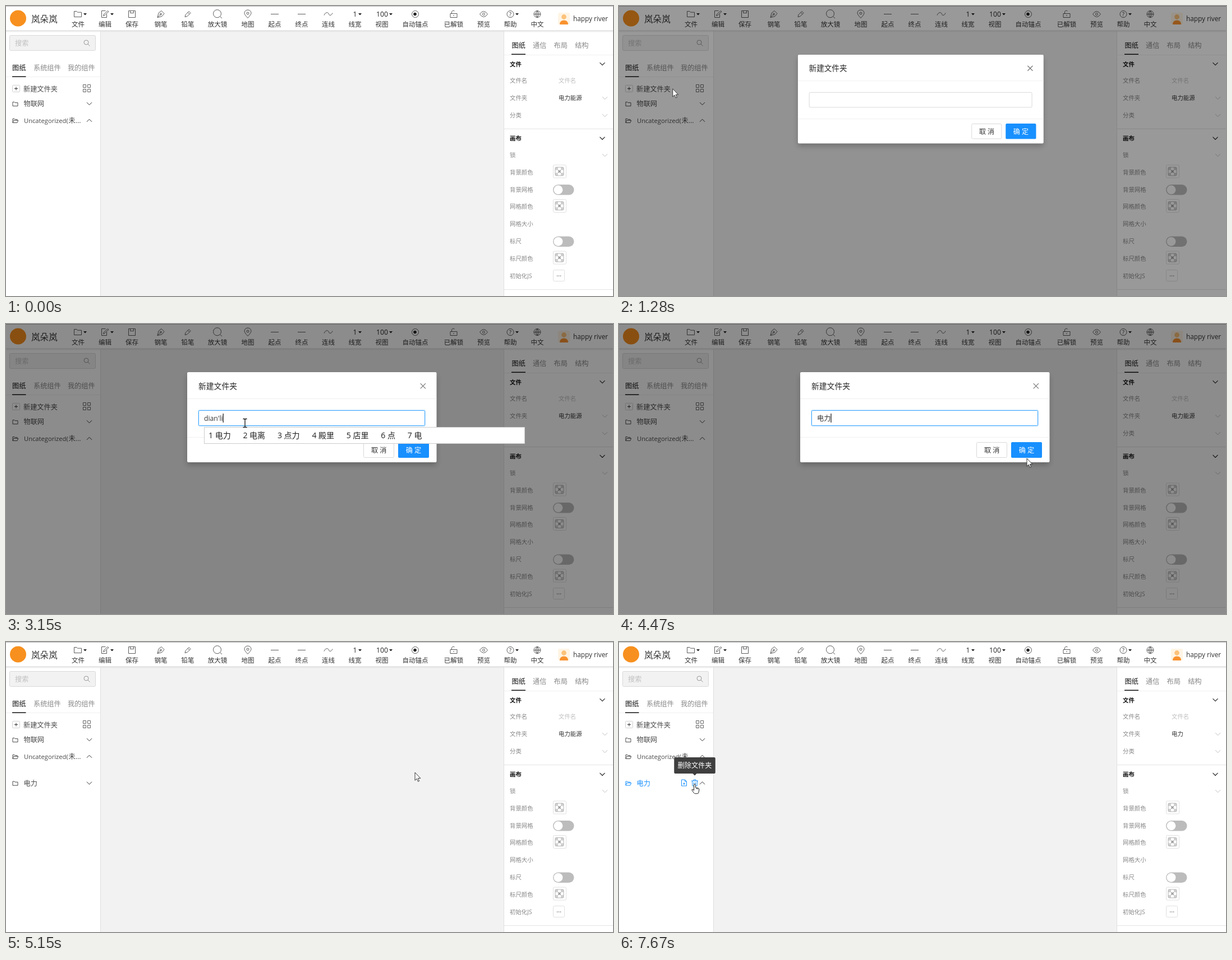
An HTML page that plays this animation: 1082 by 518 pixels, repeating every 8 s.

```html
<!DOCTYPE html>
<html lang="zh-CN">
<head>
<meta charset="utf-8">
<style>
html, body { margin: 0; width: 100%; height: 100%; overflow: hidden; background: #f2f2f2; }
svg { display: block; width: 100%; height: 100%; }
text { font-family: "Open Sans", "Noto Sans CJK SC", "Noto Sans CJK", sans-serif; white-space: pre; }
</style>
</head>
<body>
<svg id="stage" viewBox="0 0 1082 518"></svg>
<script>
const INK = '#4a4a4a', DARK = '#222', GRAY = '#888', PALE = '#bfbfbf', BLUE = '#1890ff';
const LOOP = 8000;

// Text is placed by its vertical centre.
const text = (x, cy, s, size = 12.2, fill = INK, extra = '') =>
  `<text x="${x}" y="${cy + size * .37}" font-size="${size}" fill="${fill}" ${extra}>${s}</text>`;
const mid = (x, cy, s, size, fill) => text(x, cy, s, size, fill, 'text-anchor="middle"');
const rect = (x, y, w, h, fill, extra = '') =>
  `<rect x="${x}" y="${y}" width="${w}" height="${h}" fill="${fill}" ${extra}/>`;
const box = (x, y, w, h, stroke, fill = '#fff', r = 2) =>
  rect(x + .5, y + .5, w - 1, h - 1, fill, `stroke="${stroke}" rx="${r}"`);
const icon = (x, y, d, stroke = INK, w = 1, extra = '') =>
  `<path transform="translate(${x} ${y})" d="${d}" fill="none" stroke="${stroke}" stroke-width="${w}" stroke-linejoin="round" ${extra}/>`;
const ring = r => `M${-r} 0a${r} ${r} 0 1 0 ${2 * r} 0a${r} ${r} 0 1 0 ${-2 * r} 0z`;
const group = (id, body, extra = '') => `<g id="${id}" ${extra}>${body}</g>`;

const DOWN = 'M-4.5-2.3L0 2.3 4.5-2.3', UP = 'M-4.5 2.3L0-2.3 4.5 2.3';
const FOLDER = 'M-4.5-3.5h3l1 1.2h5v6h-9z';
const OPEN = 'M-4.5 3.5v-7h3l1 1.2h4v1.6M-4.5 3.5l1.8-4.2h8l-1.8 4.2z';

const tools = [
  [128.5, '文件', 'M-7-5h4.5l1.5 1.7h7V5H-7z', 141],
  [176.5, '编辑', 'M1-6h-7V6h9V0M-3 3l1-3 7-6 1.5 1.5-7 6.5z', 189],
  [224.5, '保存', 'M-6-6H6V6H-6zM-3-6v4h6v-4'],
  [276, '钢笔', 'M-6 6l2-8 5-4 5 5-4 5zM-6 6L0 0M-1.5 0a1.5 1.5 0 1 0 3 0a1.5 1.5 0 1 0-3 0'],
  [324, '铅笔', 'M-5 5l1-4 6-6 3 3-6 6zM0-3l3 3'],
  [377, '放大镜', 'M-7.5-.8a7 7 0 1 0 14 0a7 7 0 1 0-14 0M4.5 4.2L8 7.5'],
  [431, '地图', 'M0 7Q-6 1-6-2A6 5.5 0 0 1 6-2Q6 1 0 7zM-2-1.5a2 2 0 1 0 4 0a2 2 0 1 0-4 0'],
  [479, '起点', 'M-7 0H7'],
  [527, '终点', 'M-7 0H7'],
  [574.5, '连线', 'M-7.5 2C-4-6 1-2 1 0S5 4 7.5-2'],
  [622, '线宽', '', 631],
  [670, '视图', '', 686],
  [729.5, '自动锚点', ring(6)],
  [798, '已解锁', 'M-6-1H6V6H-6zM-3.5-1v-3a3 3 0 0 1 5-1.5M0 1.5v2'],
  [851.5, '预览', 'M-7 0Q0-10 7 0Q0 10-7 0zM-2 0a2 2 0 1 0 4 0a2 2 0 1 0-4 0'],
  [899, '帮助', ring(6), 911],
  [947, '中文', ring(6) + 'M-6 0H6M0-6V6M0-6Q-6 0 0 6Q6 0 0-6'],
];

function toolbar() {
  const items = tools.map(([x, label, d, arrow]) =>
    icon(x, 14.5, d, INK, .9) + mid(x, 32.3, label, 11.5, '#333') +
    (arrow ? `<path d="M${arrow - 3} 13h6l-3 3.6z" fill="${DARK}"/>` : '')).join('');
  return rect(0, 43, 1082, 5, 'url(#shade)') + rect(0, 0, 1082, 43.5, '#fff') + rect(0, 0, 1082, 1, '#b8b8b8') +
    '<circle cx="21.5" cy="22" r="14.5" fill="#f7901e"/>' + text(45, 23, '岚朵岚', 15.6, '#333') + items +
    mid(622, 14.5, '1', 12.2, DARK) + mid(670.5, 14.5, '100', 12.2, DARK) + mid(899, 14.5, '?', 9, DARK) +
    '<circle cx="729" cy="14.5" r="2.8" fill="#222"/>' +
    rect(984, 12, 21, 21, '#fff4e4', 'rx="3"') +
    '<circle cx="994.5" cy="19.5" r="4.4" fill="#fcc27a"/><path d="M987 33q0-7.5 7.5-7.5t7.5 7.5z" fill="#f9922f"/>' +
    text(1011, 22.5, 'happy river', 11.8, '#333');
}

function leftPanel() {
  const item = (y, d, chevron) => icon(16.5, y + .5, d) + icon(148.5, y, chevron, '#333');
  return rect(0, 44, 168, 474, '#fff') + rect(168, 44, 1, 474, '#e0e0e0') +
    box(6, 52, 154, 28, '#d9d9d9', '#f2f2f2') + text(16, 66.5, '搜索', 12.2, PALE) +
    icon(143, 65, ring(4) + 'M3 3l3.5 3.5', '#999') +
    rect(0, 126, 168, 1, '#f0f0f0') + rect(11, 125.5, 24.5, 1.5, '#111') +
    text(11, 110, '图纸', 12.2, '#111', 'font-weight="500"') + text(49, 110, '系统组件', 12.2, GRAY) + text(110, 110, '我的组件', 12.2, GRAY) +
    box(11, 141, 14, 13, '#d0d0d0', '#fff', 1) + icon(18, 147.5, 'M-3 0H3M0-3V3', '#333') +
    group('create', text(31, 148, '新建文件夹', 12.2, 'currentColor')) +
    icon(144, 147, 'M-6.5-6.5h5v5h-5zM1.5-6.5h5v5h-5zM-6.5 1.5h5v5h-5zM1.5 1.5h5v5h-5z', '#666') +
    item(174.5, FOLDER, DOWN) + text(31.5, 174.5, '物联网', 12.2) +
    item(204.5, OPEN, UP) + text(32, 204.5, 'Uncategorized(', 11.2) + text(111.5, 204.5, '未...', 12.2) +
    group('row',
      group('shut', icon(16.5, 252.5, FOLDER) + icon(148.5, 252, DOWN, '#333')) +
      group('unfolded', icon(16.5, 252.5, OPEN, BLUE) + icon(148.5, 252, UP, '#333')) +
      group('rowName', text(31.5, 252, '电力', 12.2, 'currentColor')) +
      group('actions', icon(116, 251.5, 'M-4.5-5.5h6l3 3v8h-9zM1.5-5.5v3h3M-2 1.5h4M0-.5v4', BLUE) +
        icon(135, 251.5, 'M-6-3.5H6M-2-3.5v-2h4v2M-4.5-3.5l.5 9h8l.5-9M-1.5-1v4M1.5-1v4', BLUE)));
}

function rightPanel() {
  const label = (y, s) => text(898, y, s, 10.4, GRAY);
  const head = (y, s) => text(898, y, s, 10.4, '#111', 'font-weight="700"') + icon(1063, y - .3, DOWN, DARK, 1.1);
  const pick = y => icon(1067.5, y, DOWN, PALE);
  const line = y => rect(888, y, 194, 1, '#e4e4e4');
  const toggle = y => rect(975, y - 9.2, 37.5, 18.5, '#bcbcbc', 'rx="9.25"') + `<circle cx="984.4" cy="${y}" r="8" fill="#fff"/>`;
  const swatch = y => {
    let cells = '';
    for (let i = 0; i < 9; i += 2)
      cells += rect(979 + i % 3 * 5, y - 7.5 + Math.floor(i / 3) * 5, 5, 5, '#d0d0d0');
    return box(975, y - 12, 24, 24, '#e0e0e0') + cells + box(978.5, y - 8, 16, 16, '#b4b4b4', 'none') +
      icon(986.5, y, 'M-2.2-2.2l4.4 4.4M2.2-2.2l-4.4 4.4', '#777');
  };
  return rect(887, 44, 195, 474, '#fff') + rect(887, 44, 1, 474, '#e0e0e0') + rect(888, 87, 194, 1, '#f0f0f0') +
    rect(901, 85.5, 25, 1.5, '#111') + text(901.5, 70.5, '图纸', 12.2, '#111', 'font-weight="500"') +
    ['通信', '布局', '结构'].map((s, i) => text(939 + i * 37.6, 70.5, s, 12.2, GRAY)).join('') +
    head(103.7, '文件') + label(133, '文件名') + text(985, 133, '文件名', 10.4, PALE) +
    label(164, '文件夹') + group('folder', text(985, 164, '电力能源', 10.4, '#333')) + pick(164.5) +
    label(195, '分类') + pick(195.5) + line(219) +
    head(236.5, '画布') + label(266, '锁') + pick(266.5) +
    label(297, '背景颜色') + swatch(295.5) + label(328, '背景网格') + toggle(328.3) +
    label(358.3, '网格颜色') + swatch(357) + label(389.5, '网格大小') +
    label(420.5, '标尺') + toggle(420.7) + label(451, '标尺颜色') + swatch(449.5) +
    label(482, '初始化JS') + box(975, 471, 21, 21, '#e0e0e0') +
    [982, 985, 988].map(x => rect(x, 481.5, 1.2, 1.2, '#444')).join('') + line(506);
}

function dialog() {
  return group('dialog',
    rect(323, 92, 444, 160, '#000', 'opacity=".22" rx="3" filter="url(#blur)"') +
    rect(323, 86, 444.5, 161, '#fff', 'rx="2"') +
    text(343, 110.5, '新建文件夹', 13.8, '#262626') + icon(743.3, 110.7, 'M-4.6-4.6l9.2 9.2M4.6-4.6l-9.2 9.2', '#777', 1.2) +
    rect(323, 133, 444.5, 1, '#f0f0f0') + rect(323, 202, 444.5, 1, '#f0f0f0') +
    group('glow', rect(342, 153, 406, 30, BLUE, 'opacity=".22" rx="3"')) +
    rect(343.5, 154.5, 403, 27, '#fff', 'id="field" rx="2"') +
    group('typed', text(353, 168, ' ', 12.2, '#333')) + rect(376.5, 160, 1.2, 16, '#111', 'id="caret"') +
    box(637, 211, 55, 28, '#d9d9d9') + mid(664.7, 225.5, '取 消', 12.2, '#333') +
    rect(699, 211, 55, 28, BLUE, 'id="ok" rx="2"') + mid(726.5, 225.5, '确 定', 12.2, '#fff')) +
    group('ime', rect(353.5, 184.5, 479, 29, '#fff', 'id="imeBox" stroke="#ccc"') + text(361, 199, ' ', 14, '#222'));
}

const tip = (id, x, w, s) => group(id, rect(x - w / 2, 206, w, 29, '#3f3f3f', 'rx="2"') +
  `<path d="M${x - 4} 234.5h8l-4 4z" fill="#3f3f3f"/>` + mid(x, 220.5, s, 12.2, '#fff'));

const pointers = {
  arrow: icon(0, 0, 'M0 0V14.2l3.2-3 2.3 5 2.1-.9-2.2-4.9h4.4z', '#222', .9, 'style="fill:#fff"'),
  hand: icon(0, 0, 'M-1.5 1.2a1.4 1.4 0 0 1 2.8 0V6l5.2 1.2q1.6.5 1.4 2.2l-.9 5q-.4 2.4-2.6 2.4H.6q-1.2 0-2-1L-5 10.6q-.4-1.4 1-1.4l2.5 1.8zM3.4 6.8v2M5.6 7.2v2', '#222', 1, 'style="fill:#fff"'),
  beam: icon(0, 0, 'M-3.5-7.5h2.5l1 1 1-1h2.5M0-6.5v13M-3.5 7.5h2.5l1-1 1 1h2.5', '#111', 1.3),
};

document.getElementById('stage').innerHTML =
  `<defs><linearGradient id="shade" x2="0" y2="1"><stop stop-color="#cfcfcf"/><stop offset="1" stop-color="#f2f2f2" stop-opacity="0"/></linearGradient>
  <filter id="blur" x="-10%" y="-20%" width="120%" height="150%"><feGaussianBlur stdDeviation="5"/></filter></defs>` +
  rect(0, 0, 1082, 518, '#f2f2f2') + leftPanel() + rightPanel() + toolbar() +
  tip('tipAdd', 116, 62, '新建图纸') + tip('tipDelete', 135, 73.5, '删除文件夹') +
  rect(0, 0, 1082, 518, '#000', 'id="mask"') + dialog() +
  group('pointer', Object.entries(pointers).map(([k, v]) => group(k, v)).join(''));

const $ = id => document.getElementById(id);
const set = (id, name, value) => $(id).setAttribute(name, value);
const show = (id, on) => set(id, 'opacity', +on);
const label = id => $(id).querySelector('text');
const write = (id, s) => { const el = label(id); if (el.textContent !== s) el.textContent = s; };
const within = (t, a, b) => t >= a && t < b;
const ramp = (t, a, d) => Math.min(1, Math.max(0, (t - a) / d));
const latest = (list, t) => list.reduce((found, k) => t >= k[0] ? k : found, list[0]);

// time, scale, opacity, mask
const zoom = [
  [0, 1, 0, 0], [1050, .62, .5, .11], [1110, .918, .89, .22], [1220, .985, 1, .4], [1290, 1, 1, .45],
  [5000, .769, .7, .26], [5090, .45, .2, .1], [5150, 1, 0, 0],
];
const typing = [
  [0, ''], [2520, 'd'], [2600, 'di'], [2670, 'dia'], [2750, 'dian'],
  [2980, "dian'l"], [3060, "dian'li"], [3300, '电力'], [5000, ''],
];
// start, end, x, y, arc height, steps
const moves = [
  [100, 880, 52, 144, 0, 11], [1180, 1820, 426, 177, 0, 9], [4140, 4420, 727, 240, 0, 5],
  [4700, 4860, 729, 233, 0, 3], [5320, 6100, 79, 242, 72, 11], [6180, 6180, 77, 241, 0, 1],
  [6330, 6860, 112, 252, 0, 8], [7030, 7030, 111, 247, 0, 1], [7250, 7670, 135, 254, 0, 6],
];
const shapes = [
  [0, 'arrow'], [800, 'hand'], [1050, 'arrow'], [1700, 'beam'], [4220, 'arrow'],
  [4700, 'hand'], [5090, 'arrow'], [6180, 'hand'],
];

function pointerAt(t) {
  let x = 537, y = 336;
  for (const [a, b, tx, ty, arc, n] of moves) {
    if (t < a) break;
    const step = (b - a) / Math.max(1, n - 1);
    const p = t >= b ? 1 : (Math.floor((t - a) / step) + 1) / n;
    const e = (1 - Math.cos(Math.PI * p)) / 2;
    x += (tx - x) * e;
    y += (ty - y) * e + arc * Math.sin(Math.PI * e);
  }
  return [x, y];
}

function caretOn(t) {
  return within(t, 1820, 2350) || within(t, 2520, 3850) || within(t, 4380, 4910);
}

function render(t) {
  const [, scale, alpha, shade] = latest(zoom, t);
  set('mask', 'opacity', shade);
  set('dialog', 'opacity', alpha);
  set('dialog', 'transform', `translate(51 147) scale(${scale}) translate(-51 -147)`);

  const focus = within(t, 1910, 5000) ? ramp(t, 1880, 90) : 0;
  write('typed', latest(typing, t)[1]);
  set('glow', 'opacity', focus);
  set('field', 'stroke', focus ? '#40a9ff' : '#d9d9d9');
  show('caret', caretOn(t));
  set('caret', 'x', 353 + label('typed').getComputedTextLength());
  set('ok', 'fill', within(t, 4700, 5000) ? '#40a9ff' : BLUE);

  const wide = t >= 2980;
  show('ime', within(t, 2520, 3300));
  set('imeBox', 'width', wide ? 571 : 479);
  write('ime', wide ? '1 电力      2 电离      3 点力      4 殿里      5 店里      6 点      7 电'
    : t < 2750 ? '1 的      2 地      3 第      4 低      5 底      6 抵      7 弟'
    : '1 电      2 点      3 店      4 典      5 殿      6 垫      7 淀');

  const hover = t >= 6060, active = t >= 6330;
  set('create', 'color', within(t, 800, 1050) ? BLUE : INK);
  show('row', t >= 4940);
  set('rowName', 'color', hover ? BLUE : INK);
  show('actions', hover);
  show('shut', !active);
  show('unfolded', active);
  write('folder', t >= 7030 ? '电力' : '电力能源');
  set('tipAdd', 'opacity', ramp(t, 6760, 100) * (1 - ramp(t, 7400, 100)));
  set('tipDelete', 'opacity', ramp(t, 7480, 120));

  const [x, y] = pointerAt(t), shape = latest(shapes, t)[1];
  show('pointer', t >= 100);
  set('pointer', 'transform', `translate(${x} ${y})`);
  for (const k in pointers) show(k, k === shape);
}

const start = performance.now();
function tick() {
  render((performance.now() - start) % LOOP);
  requestAnimationFrame(tick);
}
tick();
</script>
</body>
</html>
```
